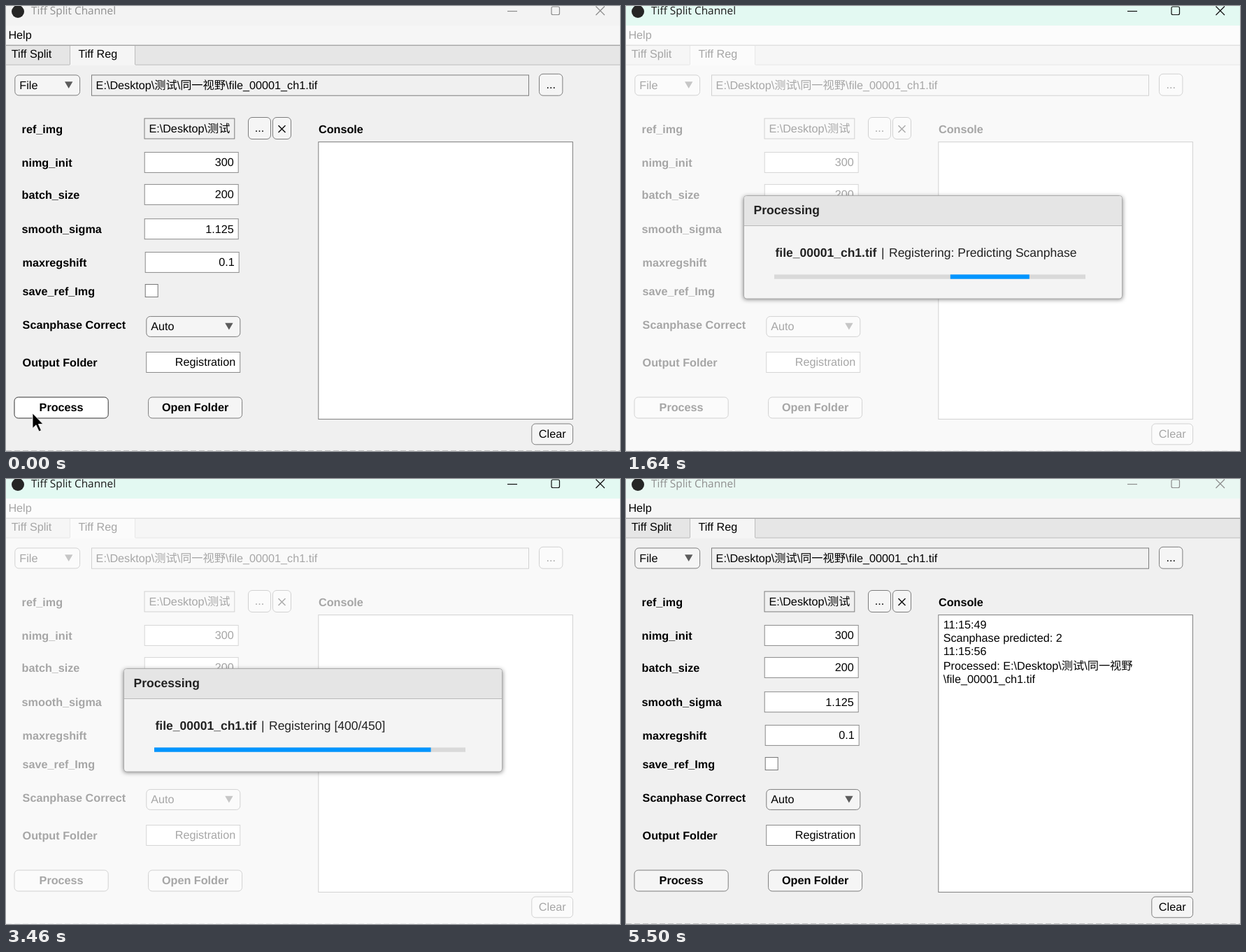
Animation of 878 by 637 pixels, one loop 5.57 s. Source, as an HTML page:

```html
<!DOCTYPE html>
<html lang="en">
<head>
<meta charset="utf-8">
<title>Tiff Split Channel</title>
<style>
html, body { margin: 0; width: 100%; height: 100%; overflow: hidden; background: #f0f0f0; }
svg { display: block; width: 100vw; height: 100vh; }
text { font-family: "Liberation Sans", Arial, "Noto Sans CJK SC", "Noto Sans CJK", sans-serif; font-size: 16.2px; text-rendering: geometricPrecision; }
.b { font-weight: bold; }
.d { font-size: 17.5px; fill: #222; }
.r { text-anchor: end; }
.m { text-anchor: middle; }
#caption { font-family: "Open Sans", "Noto Sans", sans-serif; font-size: 15.4px; }
</style>
</head>
<body>
<svg id="stage" viewBox="0 0 878 637" preserveAspectRatio="none">
  <defs>
    <linearGradient id="sheen" gradientUnits="userSpaceOnUse" x1="0" x2="170" y1="0" y2="0">
      <stop offset="0" stop-color="#0095ff"/>
      <stop offset=".5" stop-color="#4db5ff"/>
      <stop offset="1" stop-color="#0095ff"/>
    </linearGradient>
    <filter id="blur" x="-10%" y="-20%" width="120%" height="140%"><feGaussianBlur stdDeviation="3.2"/></filter>
  </defs>
  <rect width="878" height="637" fill="#f0f0f0"/>
  <g id="form"></g>
  <g id="log"></g>
  <rect id="mask" y="28" width="878" height="609" fill="#fff" fill-opacity=".65"/>
  <rect id="titlebar" width="878" height="28"/>
  <circle cx="17" cy="8" r="9" fill="#252525"/>
  <text id="caption" x="36" y="12.3">Tiff Split Channel</text>
  <g id="controls" fill="none" stroke-width="1.2">
    <path d="M717 7.5H731"/>
    <rect x="780" y="1" width="11.5" height="11.5" rx="2"/>
    <path d="M843.5 .5L856 13M856 .5L843.5 13"/>
  </g>
  <g id="dialog">
    <rect id="shadow" x="168" y="273" width="542" rx="4" fill="#000" fill-opacity=".5" filter="url(#blur)"/>
    <rect id="panel" x="168.5" y="271.5" width="541" rx="4" fill="#f4f4f4" stroke="#ababab"/>
    <path d="M169 314V275.5q0-3.5 3.5-3.5H705.5q3.5 0 3.5 3.5V314Z" fill="#e5e5e5"/>
    <path d="M169 314.5H709" stroke="#b9b9b9"/>
    <text class="d b" x="182.6" y="298">Processing</text>
    <text class="d b" x="213.5" y="359">file_00001_ch1.tif</text>
    <text id="sep" class="d m" x="367.3" y="358.5">|</text>
    <text id="msg" class="d" x="376" y="359"></text>
    <text id="msg2" class="d" x="213.5" y="381"></text>
    <g id="bar">
      <rect x="212" y="384.4" width="445" height="6.3" fill="#d9d9d9"/>
      <rect id="fill" y="384.4" height="6.3"/>
    </g>
  </g>
  <path id="cursor" d="M0 0V21.5L5 16.8L9.2 26L12.4 24.5L8.4 15.6H15Z" fill="#000" stroke="#fff" stroke-width=".8"/>
</svg>
<script>
const LOOP = 5570;
const $ = id => document.getElementById(id);
const set = (el, attrs) => { for (const k in attrs) el.setAttribute(k, attrs[k]); };
const show = (el, on) => el.setAttribute("visibility", on ? "visible" : "hidden");
const clamp = x => Math.max(0, Math.min(1, x));

// --- static form ---
const text = (x, y, s, cls = "") => `<text x="${x}" y="${y}" class="${cls}">${s}</text>`;
const box = (x, y, w, h, fill = "#fff", rx = 0, stroke = "#8a8a8a", id = "") =>
  `<rect id="${id}" x="${x}" y="${y}" width="${w}" height="${h}" rx="${rx}" fill="${fill}" stroke="${stroke}"/>`;
const button = (x, y, w, h, s, cls, ty, id = "") =>
  box(x, y, w, h, "#f5f5f5", 5.5, "#7d7d7d", id) + text(x + w / 2, ty, s, cls + " m");
const arrow = (x, y) => `<path d="M${x} ${y}h11.4l-5.7 9.6z" fill="#5c5c5c"/>`;
const field = (x, y, s, ty) => box(x, y, 134, 29) + text(x + 127.5, ty, s, "r");
const pick = (x, y, w, s, ty) =>
  box(x, y, w, 29, "#f5f5f5", 5.5, "#7d7d7d") + text(x + 6.5, ty, s) + arrow(x + w - 21.6, y + 9.4);

const labels = [
  [22.6, 181.5, "ref_img"], [22.6, 230, "nimg_init"], [22.6, 276, "batch_size"],
  [22.6, 325, "smooth_sigma"], [23.6, 373, "maxregshift"], [23.6, 413.5, "save_ref_Img"],
  [23.6, 462, "Scanphase Correct"], [23.6, 515.5, "Output Folder"], [447, 181.5, "Console"]
];

$("form").innerHTML =
  `<rect y="28" width="878" height="28" fill="#f6f6f6"/>
   <rect y="56" width="878" height="28" fill="#e6e6e6"/>
   <path d="M0 56.2H878" stroke="#8a8a8a"/><path d="M0 84.2H878" stroke="#bdbdbd"/>
   <rect x="91" y="57" width="94" height="28" fill="#f5f5f5"/>
   <path d="M91.5 57V84M184.5 57V84" stroke="#bdbdbd"/>
   <path d="M0 636.5H878" stroke="#c4c4c4" stroke-dasharray="8 4"/>` +
  text(3.4, 46.6, "Help") + text(7.8, 74.4, "Tiff Split") + text(103.4, 74.4, "Tiff Reg") +
  pick(12.8, 98.9, 92.8, "File", 118.6) +
  box(122.5, 98.9, 625, 29.3, "#f0f0f0", 0, "#7d7d7d") +
  text(128.6, 119, "E:\\Desktop\\测试\\同一视野\\file_00001_ch1.tif") +
  button(762.5, 97.3, 33.4, 30.9, "...", "", 118) +
  labels.map(([x, y, s]) => text(x, y, s, "b")).join("") +
  box(198, 161, 128.8, 29, "#f0f0f0", 0, "#7d7d7d") + text(204.4, 181, "E:\\Desktop\\测试") +
  button(346.5, 159.5, 32, 31, "...", "", 180) +
  box(381.5, 159.5, 26, 31, "#f5f5f5", 5.5, "#7d7d7d") +
  `<path d="M389.5 171l10 10M399.5 171l-10 10" stroke="#111" stroke-width="1.5"/>` +
  field(198.2, 209.4, "300", 229.3) + field(198.2, 255.4, "200", 275.3) +
  field(198.2, 304.7, "1.125", 324.8) + field(199.2, 352.4, "0.1", 372.3) +
  box(199.2, 398.5, 18, 18, "#fff", 0, "#777") +
  pick(200.8, 444.4, 134, "Auto", 463.6) + field(200.7, 495.5, "Registration", 515) +
  button(12, 560, 134.2, 30, "Process", "b", 580.3, "process") +
  button(203.6, 560, 134, 30, "Open Folder", "b", 580.3) +
  box(446.8, 194.6, 363.6, 396.8, "#fff", 0, "#7d7d7d") +
  button(751.8, 598, 58.8, 29.8, "Clear", "", 618);

$("log").innerHTML = [
  [214, "11:15:49"], [233, "Scanphase predicted: 2"], [252, "11:15:56"],
  [273.3, "Processed: E:\\Desktop\\测试\\同一视野"], [292.2, "\\file_00001_ch1.tif"]
].map(([y, s]) => text(453.7, y, s)).join("");

// --- timing: the screen refreshes in bursts [start, end, steps] and rests between ---
const bursts = [
  [70, 580, 8], [650, 1140, 8], [1210, 1760, 9], [1830, 1970, 3], [2370, 2860, 8],
  [2930, 3000, 2], [3460, 4010, 9], [4080, 4570, 8], [5430, 5500, 2]
];
function refresh(t) {
  let last = 0;
  for (const [a, b, n] of bursts) {
    if (t < a) break;
    const step = (b - a) / (n - 1);
    last = a + Math.min(n - 1, Math.floor((t - a) / step + 1e-6)) * step;
  }
  return last;
}

const messages = [
  [0, ""], [650, "Registering: Predicting Scanphase"],
  [1830, "Registering: Use Ref Image to", "Register"],
  [2370, "Registering [200/450]"], [2850, "Registering [400/450]"],
  [3725, "Registering: Generating Avg Image"]
];

// Returns [left, width, colour] of the blue part, relative to the track.
function progress(t) {
  const slide = start => {
    const right = 157 * Math.pow(Math.max(0, t - start) / 490, 1.23);
    const left = Math.max(0, right - 113);
    return [left, Math.min(445, right) - left, "#0095ff"];
  };
  if (t < 650) return [0, 2, "#7ea9e6"];
  if (t < 1830) return slide(650);
  if (t < 2370) return [0, 0, "#0095ff"];
  if (t >= 3725) return slide(3730);
  const first = 1 - Math.pow(1 - clamp((t - 2380) / 300), 2);
  const second = clamp((t - 2842) / 158);
  return [0, 445 * 4 / 9 * (first + second), "url(#sheen)"];
}

function draw(time) {
  const t = refresh(time);
  const active = t >= 70 && t < 5430;
  set($("titlebar"), { fill: t < 70 ? "#f3f3f3" : active ? "#e3f9f2" : "#e9f7f2" });
  set($("caption"), { fill: active ? "#1a1a1a" : "#8f8f8f" });
  set($("controls"), { stroke: active ? "#111" : "#8c8c8c" });

  const hover = t < 140;
  set($("process"), { fill: hover ? "#fff" : "#f5f5f5", stroke: hover ? "#333" : "#7d7d7d" });
  show($("mask"), t >= 140 && t < 4430);
  show($("log"), t >= 4500);

  const k = clamp(t / 361);
  set($("cursor"), { transform: `translate(${38 + 5 * k} ${583 - 6 * k})` });
  show($("cursor"), t < 580);

  const open = t >= 215 && t < 4360;
  $("dialog").style.display = open ? "" : "none";
  if (!open) return;

  const [, line, extra = ""] = messages.filter(m => m[0] <= t).pop();
  const grow = extra ? 21.5 : 0;
  $("msg").textContent = line;
  $("msg2").textContent = extra;
  $("sep").style.display = line ? "" : "none";
  set($("panel"), { height: 147.5 + grow });
  set($("shadow"), { height: 147 + grow });
  set($("bar"), { transform: `translate(0 ${grow})` });

  const [left, width, fill] = progress(t);
  set($("fill"), { x: 212 + left, width, fill });
  const glow = 300 + .45 * (t - 2650);
  set($("sheen"), { x1: glow, x2: glow + 170 });
}

const begin = performance.now();
function tick() {
  draw((performance.now() - begin) % LOOP);
  requestAnimationFrame(tick);
}
tick();
</script>
</body>
</html>
```
